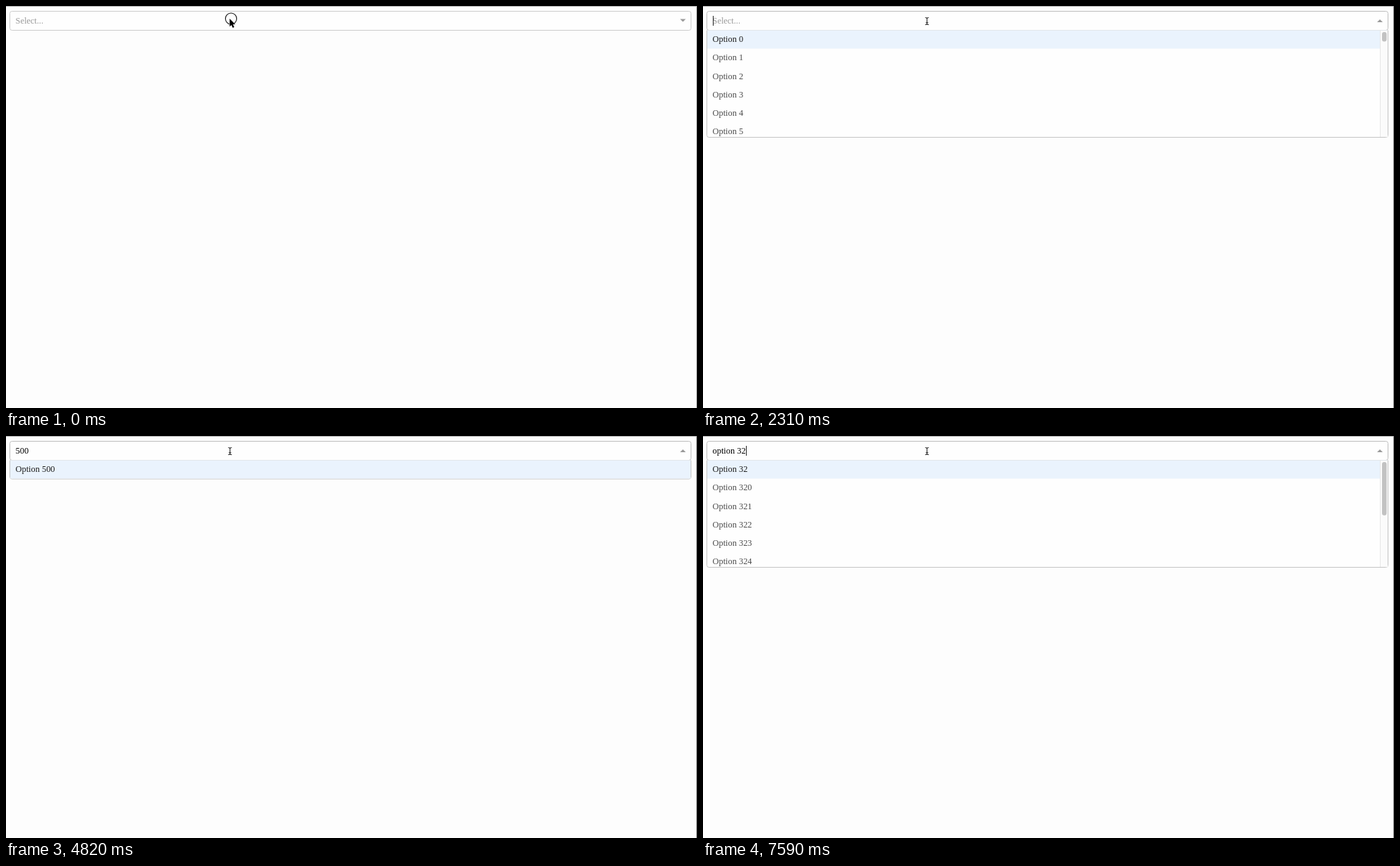
An HTML page that plays this animation: 981 by 571 pixels, repeating every 8 s.

```html
<!DOCTYPE html>
<html lang="en">
<head>
<meta charset="utf-8">
<title>Filterable select</title>
<style>
  html, body { margin: 0; width: 100%; height: 100%; overflow: hidden; background: #fdfdfd; }
  svg { display: block; width: 981px; height: 571px; }
  text { font: 12.35px "Liberation Serif", "Times New Roman", serif; white-space: pre; }
</style>
</head>
<body>
<svg viewBox="0 0 981 571">
  <rect width="981" height="571" fill="#fdfdfd"/>
  <path d="M0 .5H981" stroke="#b0b0b0"/>
  <path id="edge" d="M980.5 0V571"/>

  <rect id="control" x="5.5" y="7.5" width="967" height="27" rx="3" fill="#fefefe" stroke="#ccc"/>
  <g id="menu">
    <path id="frame" fill="#fefefe" stroke="#c4c4c4"/>
    <rect id="focus" x="6" y="35" height="25.5" fill="#eaf3fd"/>
    <path d="M6 34.5H972" stroke="#e2e6ea"/>
    <g id="rows"></g>
    <g id="scroll">
      <rect x="961" y="35" width="11" height="151" fill="#fbfbfb"/>
      <path d="M961.5 35V186" stroke="#e7e7e7"/>
      <rect id="thumb" x="964" y="37" width="6.5" rx="3" fill="#c2c2c2"/>
    </g>
  </g>
  <path id="arrow" fill="#999"/>
  <text id="value" x="13.6" y="24.6"></text>
  <rect id="caret" y="14" width="1" height="14" fill="#222"/>

  <circle id="ring" r="8" fill="none" stroke="#111" stroke-width="1.1"/>
  <path id="pointer" d="M0 0V11.3L2.6 8.9L4.4 13L6.5 12.1L4.7 8.1H8Z"
        fill="#000" stroke="#fff" stroke-width="1" paint-order="stroke"/>
  <path id="beam" d="M315.5 16.5Q318 16.5 318 18V25Q318 26.5 315.5 26.5M320.5 16.5Q318 16.5 318 18M318 25Q318 26.5 320.5 26.5M316.5 23.5H319.5"
        fill="none" stroke="#222" stroke-width="1.1"/>
</svg>
<script>
const LOOP = 8000, OPEN_AT = 1320, ROW = 26.05, VISIBLE = 6;
const $ = id => document.getElementById(id);
const set = (id, attrs) => {
  for (const name in attrs) $(id).setAttribute(name, attrs[name]);
};
const show = (id, on) => set(id, { visibility: on ? "inherit" : "hidden" });
const within = (t, from, to) => t >= from && t < to;
const options = Array.from({ length: 1100 }, (_, i) => "Option " + i);

// [start time, typed query]
const typing = [
  [0, ""], [3560, "5"], [4010, "50"], [4280, "500"], [5270, "50"], [5450, "5"],
  [5630, ""], [6080, "o"], [6260, "op"], [6440, "opt"], [6610, "optio"],
  [6700, "option"], [6870, "option "], [7230, "option 3"], [7590, "option 32"]
];
const caretGaps = [[1860, 2310], [2850, 3290], [4820, 5270], [5810, 6080]];
const clicks = [[0, 90], [360, 480], [1140, 1230]];
const pointerSteps = [[0, 18], [480, 19.5], [870, 20], [960, 20.7]];

const latest = (steps, t) => steps.filter(([start]) => start <= t).pop()[1];
const during = (spans, t) => spans.some(([from, to]) => within(t, from, to));

for (let i = 0; i < VISIBLE; i++) {
  const row = document.createElementNS("http://www.w3.org/2000/svg", "text");
  row.setAttribute("x", 13.6);
  row.setAttribute("y", 51.4 + i * ROW);
  row.setAttribute("fill", i ? "#4d4d4d" : "#1c1c1c");
  $("rows").append(row);
}

function drawMenu(query) {
  const matches = options.filter(o => o.toLowerCase().includes(query));
  const scrolls = matches.length >= VISIBLE;
  const bottom = scrolls ? 186.5 : 35 + matches.length * ROW;
  set("frame", { d: `M5.5 34.5V${bottom - 3}q0 3 3 3H969.5q3 0 3 -3V34.5` });
  set("focus", { width: scrolls ? 955 : 966 });
  set("thumb", { height: Math.max(13.5, 147.2 ** 2 / (matches.length * 26)) });
  show("scroll", scrolls);
  [...$("rows").children].forEach((row, i) => row.textContent = matches[i] || "");
}

let drawnQuery;
function draw(t) {
  const open = t >= OPEN_AT;
  const query = latest(typing, t);
  const tipY = latest(pointerSteps, t);

  if (query !== drawnQuery) {
    drawMenu(query);
    $("value").textContent = query || "Select...";
    set("value", { fill: query ? "#000" : "#999" });
    const width = query ? $("value").getComputedTextLength() : 0;
    set("caret", { x: Math.round(13.6 + width) });
    drawnQuery = query;
  }

  set("edge", { stroke: t < 360 ? "#a6a6a6" : "#7c7c7c" });
  set("control", { stroke: open ? "#bdbdbd" : "#ccc" });
  set("arrow", { d: open ? "M957 23L961 19L965 23Z" : "M957 18.5H965L961 22.5Z" });
  show("menu", open);
  $("menu").style.display = open ? "" : "none";
  show("caret", open && !during(caretGaps, t));

  show("ring", during(clicks, t));
  set("ring", { cx: 319.5, cy: tipY });
  show("pointer", !open);
  set("pointer", { transform: `translate(317.5 ${tipY})` });
  show("beam", open);
}

const start = performance.now();
function tick() {
  draw((performance.now() - start) % LOOP);
  requestAnimationFrame(tick);
}
tick();
</script>
</body>
</html>
```
